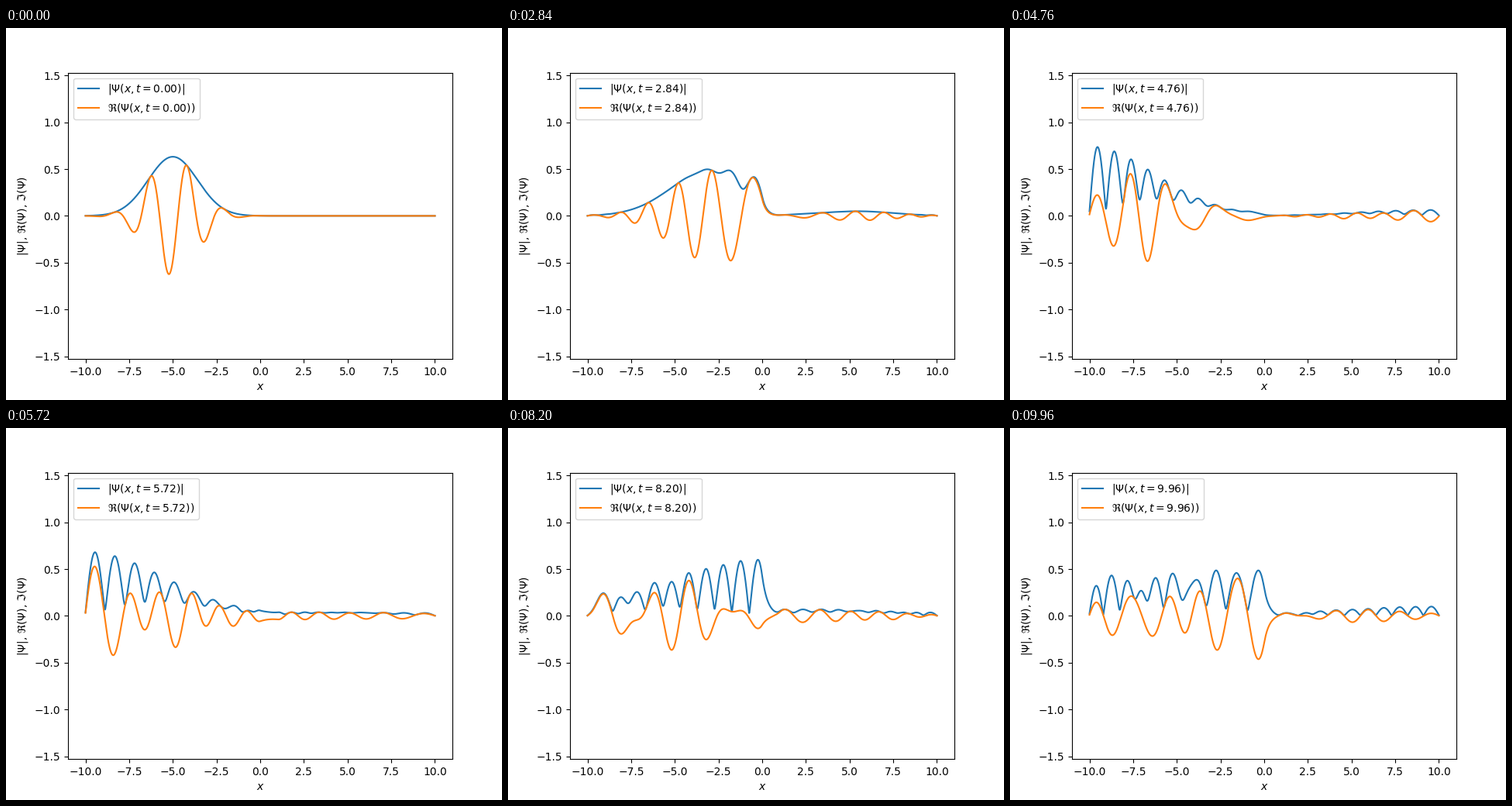
Recreate the animation shown at these times as a matplotlib script. Size 640 by 480 pixels, loop 10000 ms.

```python
"""Gaussian wave packet hitting a square barrier inside a box with hard walls."""
import numpy as np
import matplotlib.pyplot as plt
from matplotlib.animation import FuncAnimation

FRAMES = 250
INTERVAL = 40          # ms per frame
DT = 0.04              # simulated time per frame

POINTS = 1000
X0, K0, SIGMA = -5.0, 3.0, 1.0
BARRIER = 10.0         # height on 0 <= x <= 1


def hamiltonian(x):
    """Finite-difference H = -1/2 d2/dx2 + V(x), zero outside the grid."""
    step = x[1] - x[0]
    potential = np.where((x >= 0) & (x <= 1), BARRIER, 0.0)
    hop = np.full(len(x) - 1, -0.5 / step**2)
    return (np.diag(1 / step**2 + potential)
            + np.diag(hop, 1) + np.diag(hop, -1))


def evolve(x, times):
    """Return the wave function, one row per time."""
    start = ((2 * np.pi * SIGMA**2) ** -0.25
             * np.exp(-(x - X0) ** 2 / (4 * SIGMA**2) + 1j * K0 * x))
    energy, modes = np.linalg.eigh(hamiltonian(x))
    weights = modes.T @ start
    phases = np.exp(-1j * np.outer(energy, times))
    return (modes @ (weights[:, None] * phases)).T


def labels(t):
    return (rf"$|\Psi(x,t={t:.2f})|$",
            rf"$\Re(\Psi(x,t={t:.2f}))$")


x = np.linspace(-10, 10, POINTS)
times = np.arange(FRAMES) * DT
psi = evolve(x, times)

fig, ax = plt.subplots(figsize=(6.4, 4.8), dpi=100)
abs_label, real_label = labels(0)
abs_line, = ax.plot(x, np.abs(psi[0]), label=abs_label)
real_line, = ax.plot(x, psi[0].real, label=real_label)
ax.set_ylim(-1.53, 1.53)
ax.set_xlabel("$x$")
ax.set_ylabel(r"$|\Psi|$, $\Re(\Psi)$, $\Im(\Psi)$")
legend = ax.legend(loc="upper left")


def update(i):
    abs_line.set_ydata(np.abs(psi[i]))
    real_line.set_ydata(psi[i].real)
    for text, label in zip(legend.get_texts(), labels(times[i])):
        text.set_text(label)
    return abs_line, real_line, legend


anim = FuncAnimation(fig, update, frames=FRAMES, interval=INTERVAL,
                     repeat=True, repeat_delay=0, blit=False)
plt.show()
```
